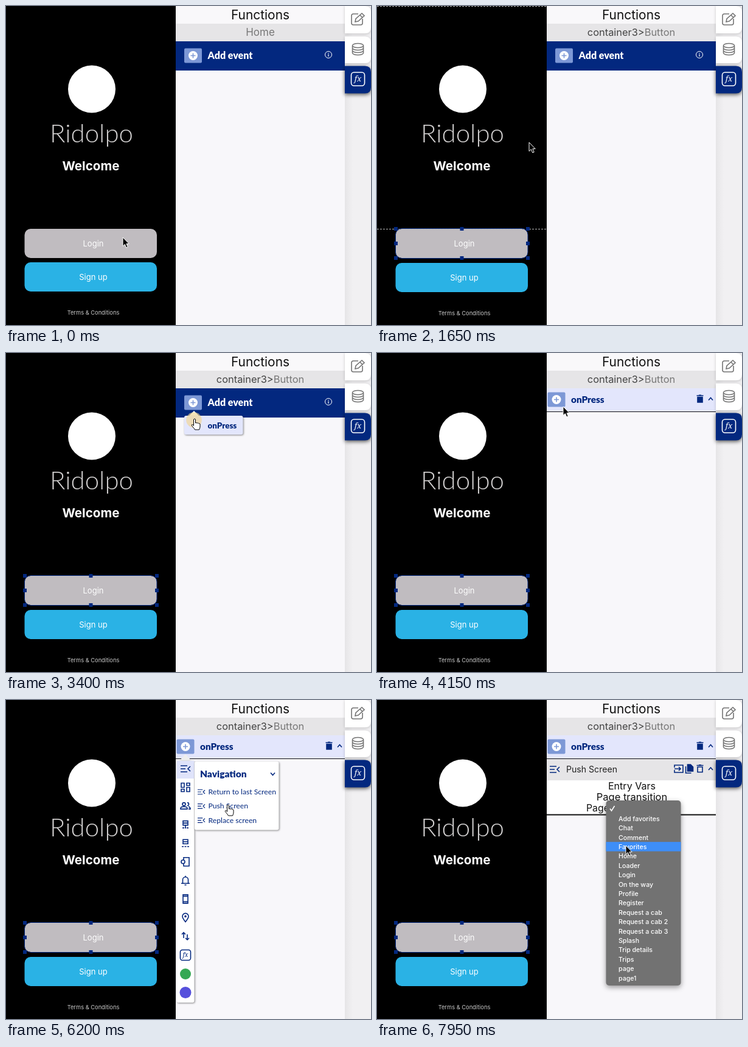
An HTML page that plays this animation: 600 px wide and 524 px high, repeating every 8000 ms.

```html
<!DOCTYPE html>
<html lang="en">
<head>
<meta charset="utf-8">
<title>App builder demo</title>
<style>
html, body { margin: 0; height: 100%; overflow: hidden; background: #f8f7fa; }
svg { display: block; width: 600px; height: 524px; }
text { font-family: Inter, sans-serif; white-space: pre; }
.lato { font-family: Lato, sans-serif; }
.heavy { font-family: Lato, sans-serif; font-weight: 900; }
.line { fill: none; stroke: #03287f; stroke-width: 1.6; }
.shadow { filter: drop-shadow(1px 1px 1.5px #0007); }
.tab { filter: drop-shadow(0 1px 2px #0003); }
.tab.active { filter: drop-shadow(0 2px 3px #000a); }
</style>
</head>
<body>
<svg id="stage" viewBox="0 0 600 524"></svg>
<script>
const NAVY = '#03287f', LAVENDER = '#e3e6fc', LOOP = 8000;
const PANEL = 279, PANEL_WIDTH = 278;
const SELECT = 900, ADD_MENU = 2700, EVENT = 3520, ACTION_MENU = 4450,
      SUBMENU = 4950, ACTION = 6350, PAGE_LIST = 7400;

const rect = (x, y, w, h, fill, more = '') =>
  `<rect x="${x}" y="${y}" width="${w}" height="${h}" fill="${fill}" ${more}/>`;
const band = (y, h, fill) => rect(PANEL, y, PANEL_WIDTH, h, fill);
const circle = (x, y, r, fill, more = '') =>
  `<circle cx="${x}" cy="${y}" r="${r}" fill="${fill}" ${more}/>`;
const text = (x, y, size, fill, str, more = '') =>
  `<text x="${x}" y="${y}" font-size="${size}" fill="${fill}" ${more}>${str}</text>`;
const middle = 'text-anchor="middle"';
const icon = (x, y, d, more = '', scale = 1) =>
  `<path class="line" transform="translate(${x} ${y}) scale(${scale})" d="${d}" ${more}/>`;
const show = (from, to, body) => `<g data-from="${from}" data-to="${to}">${body}</g>`;

const NAV = 'M-8-5H3M-8 0H0M-8 5H3M8-4L4 0L8 4';
const CARET_UP = 'M-3.5 2L0-2L3.5 2';
const CARET_DOWN = 'M-3.5-2L0 2L3.5-2';
const BIN = 'M-4-3h8v8.5h-8zM-5.5-5.5h11M-2-6.3h4';
const MENU_ICONS = [
  NAV,
  'M-7-7h5v7h-5zM2-7h5v4h-5zM2 0h5v7h-5zM-7 3h5v4h-5z',
  'M-5-3a2.5 2.5 0 1 1 5 0a2.5 2.5 0 1 1-5 0M-8 5v-1q0-3 5.500-3t5.500 3v1zM3-5.5a2.500 2.500 0 0 1 0 5M5 1q3 1 3 4h-3',
  'M-4-6h8v3.500h-8zM-4-2.500h8v3.500h-8zM0 1v4M-5 5.500h3M-1 5.500h2M2 5.500h3',
  'M-4-6h8v3.500h-8zM-4-2.500h8v3.500h-8zM-6 5.500h3M-1.500 5.500h3M3 5.500h3',
  'M-3-3v-4h9v14h-9v-4M-7 0a3 3 0 1 0 6 0a3 3 0 1 0-6 0',
  'M-7 5h14M-4.5 5v-6a4.5 4.5 0 0 1 9 0v6M-1.5 7.5h3M0-7.5v2',
  'M-4-7h8v14h-8zM-4-4.5h8M-4 4.5h8',
  'M0 7C-4 2-5 0-5-2a5 5 0 0 1 10 0C5 0 4 2 0 7zM-1-2a1 1 0 1 0 2 0a1 1 0 1 0-2 0',
  'M-3 3v-9M-6-3l3-3l3 3M3-3v9M0 3l3 3l3-3'
];
const PAGES = ['Add favorites', 'Chat', 'Comment', 'Favorites', 'Home', 'Loader', 'Login',
  'On the way', 'Profile', 'Register', 'Request a cab', 'Request a cab 2', 'Request a cab 3',
  'Splash', 'Trip details', 'Trips', 'page', 'page1'];
const ROW = 15.41, ROWS_TOP = 171.5;

const fx = (x, y, size, color) =>
  rect(x - size / 2, y - size / 2, size, size, 'none', `rx="${size / 5}" stroke="${color}" stroke-width="1.6"`) +
  text(x, y + size * .2, size * .6, color, '<tspan font-style="italic">fx</tspan>', middle + ' style="font-family:Noto Serif,serif"');

const plusButton = (x, y) =>
  rect(x, y, 29, 24, '#7d98d6', 'rx="2"') + circle(x + 14.5, y + 12, 7.5, '#fff') +
  icon(x + 14.5, y + 12, 'M-4 0h8M0-4v8', 'style="stroke:#7d98d6"');

function phone() {
  const handles = [[31, 366], [139.5, 366], [248, 366], [31, 390], [248, 390], [31, 414], [139.5, 414], [248, 414]];
  return rect(0, 0, PANEL, 524, '#000') +
    circle(141, 136.5, 39, '#fff') +
    text(140.5, 224, 42, '#d2d0d0', 'Ridolpo', middle + ' class="lato" font-weight="300"') +
    text(139.5, 270, 20.6, '#fff', 'Welcome', middle + ' font-weight="700"') +
    rect(30.5, 366, 217.5, 48, '#c0bcc0', 'rx="10"') +
    text(143.5, 395, 13, '#fff', 'Login', middle) +
    '<g id="lower">' + rect(30.5, 421, 217.5, 48, '#2ab2e5', 'rx="10"') +
    text(143.5, 450, 13, '#fff', 'Sign up', middle) +
    text(143.5, 507, 9.3, '#c8c8c8', 'Terms &amp; Conditions', middle) + '</g>' +
    show(SELECT, 1850, '<path d="M0 .5H279M0 366.5H279" stroke="#bbb" stroke-dasharray="3 2"/>') +
    show(SELECT, LOOP, rect(30.5, 365.5, 217.5, 49, 'none', `rx="10" stroke="${NAVY}"`) +
      handles.map(([x, y]) => rect(x - 3, y - 3, 6, 6, NAVY)).join(''));
}

function sidebar() {
  const tab = (y, h, fill, state = '') =>
    `<path class="tab ${state}" d="M557 ${y}h33q10 0 10 10v${h - 20}q0 10-10 10h-33z" fill="${fill}"/>`;
  const grey = 'style="stroke:#737373"';
  return rect(557, 0, 43, 524, 'url(#edge)') +
    tab(0, 45, '#fff') + tab(50, 44, '#fff') + tab(98.5, 45, NAVY, 'active') +
    icon(578, 22, 'M1-9h-8q-3 0-3 3v12q0 3 3 3h12q3 0 3-3v-7M-4 4l1-5L7-10l4 4L1 3zM4-7l4 4', grey) +
    icon(578.5, 71, 'M-9-6a9 3.500 0 0 1 18 0a9 3.500 0 0 1-18 0v12a9 3.500 0 0 0 18 0v-12M-9-2a9 3.500 0 0 0 18 0M-9 2a9 3.500 0 0 0 18 0', grey) +
    fx(578.5, 120, 22, '#fff');
}

function header() {
  return band(0, 29, '#f9f8fa') + band(29, 29, '#e6e5e7') +
    text(418, 21.5, 20.9, '#111', 'Functions', middle) +
    show(0, SELECT, text(418, 49, 17, '#777', 'Home', middle)) +
    show(SELECT, LOOP, text(418, 49, 16.4, '#444', 'container3&gt;<tspan fill="#777">Button</tspan>', middle));
}

function addEvent() {
  return show(0, EVENT, band(58, 48, NAVY) + plusButton(293, 69.5) +
      text(331.5, 87, 16, '#fff', 'Add event', 'class="heavy"') +
      circle(530, 80, 5.5, 'none', 'stroke="#fff"') +
      icon(530, 80, 'M0-3v1.2M0-.8v3.8', 'style="stroke:#fff;stroke-width:1.2"')) +
    show(ADD_MENU, EVENT, '<path d="M309 95l12 12h-24z" fill="#fff"/>' +
      rect(293, 103, 96.5, 31, LAVENDER, 'rx="3" class="shadow"') +
      text(331.5, 123.5, 13.4, NAVY, 'onPress', 'class="heavy"'));
}

function eventRow() {
  return show(EVENT, LOOP, band(58, 38, LAVENDER) + band(96, 1, '#111') +
    plusButton(280.5, 64.5) + text(319, 82, 15.3, NAVY, 'onPress', 'class="heavy"') +
    icon(531, 75.5, BIN, `style="fill:${NAVY}"`) + icon(548.5, 75.5, CARET_UP));
}

function actionMenu() {
  const items = ['Return to last Screen', 'Push Screen', 'Replace screen'];
  return show(ACTION_MENU, ACTION,
      '<path d="M295 89l11 12h-22z" fill="#eee"/>' +
      rect(280.5, 100, 29, 397, '#fff', 'rx="3" class="shadow"') +
      show(SUBMENU, LOOP, rect(280.5, 100, 29, 29, '#dfe3fa')) +
      MENU_ICONS.map((d, i) => icon(295, 113 + 30.55 * i, d)).join('') +
      fx(295, 419, 17, NAVY) + circle(295, 450, 9, '#34a853') + circle(295, 480.5, 9.5, '#5650dc')) +
    show(SUBMENU, ACTION, rect(310, 101, 138.5, 112.5, '#fff', 'rx="3" class="shadow"') +
      text(319, 127, 15.5, NAVY, 'Navigation', 'class="heavy"') + icon(438.5, 121.5, CARET_DOWN) +
      items.map((s, i) => icon(321, 151 + 23.3 * i, NAV, '', .75) +
        text(332.5, 155 + 23.3 * i, 12.2, NAVY, s, 'class="lato"')).join(''));
}

function pushScreen() {
  return show(ACTION, LOOP, band(97, 35, '#e6e5e7') + band(132, 56, '#fff') +
    band(187.5, 2, '#111') + icon(292, 114, NAV) +
    text(311, 119, 14.1, '#222', 'Push Screen') +
    icon(496, 113, 'M-7-2v-4H7v12H-7v-4M-7 0H3M0-3l3 3l-3 3') +
    icon(513.5, 113, 'M-6-4V7H3') +
    icon(513.5, 113, 'M-3-7h5l4 4v7h-9z', `style="fill:${NAVY}"`) +
    icon(531, 113, BIN) + icon(548.5, 113, CARET_UP) +
    text(419, 147, 16.1, '#111', 'Entry Vars', middle) +
    text(419, 165, 16.5, '#111', 'Page transition', middle) +
    text(344, 183, 15.8, '#111', 'Page:') +
    rect(387.5, 171, 106.5, 16, '#fff', 'rx="3.5" stroke="#ddd" stroke-width=".7"') +
    rect(480, 171, 14, 16, '#3b86f3', 'rx="3.5"') +
    icon(487, 179, 'M-2.5-2L0-4.5L2.5-2M-2.5 2L0 4.5L2.5 2', 'style="stroke:#fff;stroke-width:1.3"'));
}

function pageList() {
  return show(PAGE_LIST, LOOP, rect(376.5, 165, 123, 304, '#727272', 'rx="5" style="filter:drop-shadow(0 3px 4px #0006)"') +
    rect(376.5, 0, 123, 15.4, '#3e8ef7', 'id="hover"') +
    icon(386.5, 178, 'M-3.5 .5L-1 4L4-4', 'style="stroke:#fff"') +
    PAGES.map((s, i) => text(397, 198.7 + ROW * i, 10.6, '#fff', s, 'font-weight="500"')).join(''));
}

const pointer = `<circle id="ring" fill="#f3d48f"/><g id="cursor">
  <path id="arrow" d="M0 0V14.5L3.4 11.4L5.8 17L8.2 16L5.9 10.6H10.2Z" fill="#000" stroke="#fff"/>
  <path id="hand" d="M-.5 1q1.5-2 3 0v6q1.5-1.2 2.6.2q1.5-1 2.5.4q2-.4 2.4 1.4v4q0 2-1.5 5h-7q-1-2-5-6.5q-1-2 1-2l2 1.8z" fill="#fff" stroke="#000"/></g>`;

const stage = document.getElementById('stage');
stage.innerHTML = `<defs><linearGradient id="edge"><stop offset="0" stop-color="#e6e5e7"/>
  <stop offset=".3" stop-color="#f1f0f2"/></linearGradient></defs>` +
  rect(0, 0, 600, 524, '#f8f7fa') + phone() + header() + addEvent() +
  eventRow() + pushScreen() + actionMenu() + sidebar() + pageList() + pointer;

// Cursor stops: time, x, y
const PATH = [[0, 192, 380], [500, 189, 384], [1150, 189, 384], [1650, 250, 224], [2350, 308, 82],
  [2850, 308, 82], [3200, 309, 108], [3650, 309, 108], [4150, 306, 88], [4350, 296, 77],
  [4600, 296, 77], [4950, 298, 111], [5300, 299, 113], [5500, 304, 116], [6000, 364, 172],
  [6450, 364, 172], [7050, 404, 178], [7680, 404, 178], [7950, 409, 239], [8000, 409, 241]];
const CLICKS = [850, 2650, 3360, 4400, 6270, 7350];
const HAND_TIMES = [[2250, 3620], [4230, 6380]];

const $ = id => document.getElementById(id);
const lower = $('lower'), hover = $('hover'), ring = $('ring'), cursor = $('cursor'), arrow = $('arrow'), hand = $('hand');
const timed = [...stage.querySelectorAll('[data-from]')];
const toggle = (el, on) => el.style.display = on ? '' : 'none';

function cursorAt(t) {
  const i = Math.max(1, PATH.findIndex(stop => stop[0] > t));
  const [t0, x0, y0] = PATH[i - 1], [t1, x1, y1] = PATH[i];
  const p = (t - t0) / (t1 - t0), ease = p * p * (3 - 2 * p);
  return [x0 + (x1 - x0) * ease, y0 + (y1 - y0) * ease];
}

function draw(t) {
  for (const el of timed) toggle(el, t >= +el.dataset.from && t < +el.dataset.to);
  lower.setAttribute('transform', `translate(0 ${t >= SELECT ? 1 : 0})`);

  const [x, y] = cursorAt(t);
  const isHand = HAND_TIMES.some(([from, to]) => t >= from && t < to);
  cursor.setAttribute('transform', `translate(${x} ${y})`);
  toggle(hand, isHand);
  toggle(arrow, !isHand);
  hover.setAttribute('y', ROWS_TOP + ROW * Math.max(0, Math.floor((y - ROWS_TOP) / ROW)));

  const click = CLICKS.find(c => t >= c && t < c + 200);
  toggle(ring, click !== undefined);
  if (click !== undefined) {
    const p = (t - click) / 200;
    ring.setAttribute('cx', x);
    ring.setAttribute('cy', y + 2);
    ring.setAttribute('r', 12 + 4 * p);
    ring.setAttribute('opacity', .8 * (1 - p));
  }
}

const start = performance.now();
function tick() {
  draw((performance.now() - start) % LOOP);
  requestAnimationFrame(tick);
}
tick();
</script>
</body>
</html>
```
